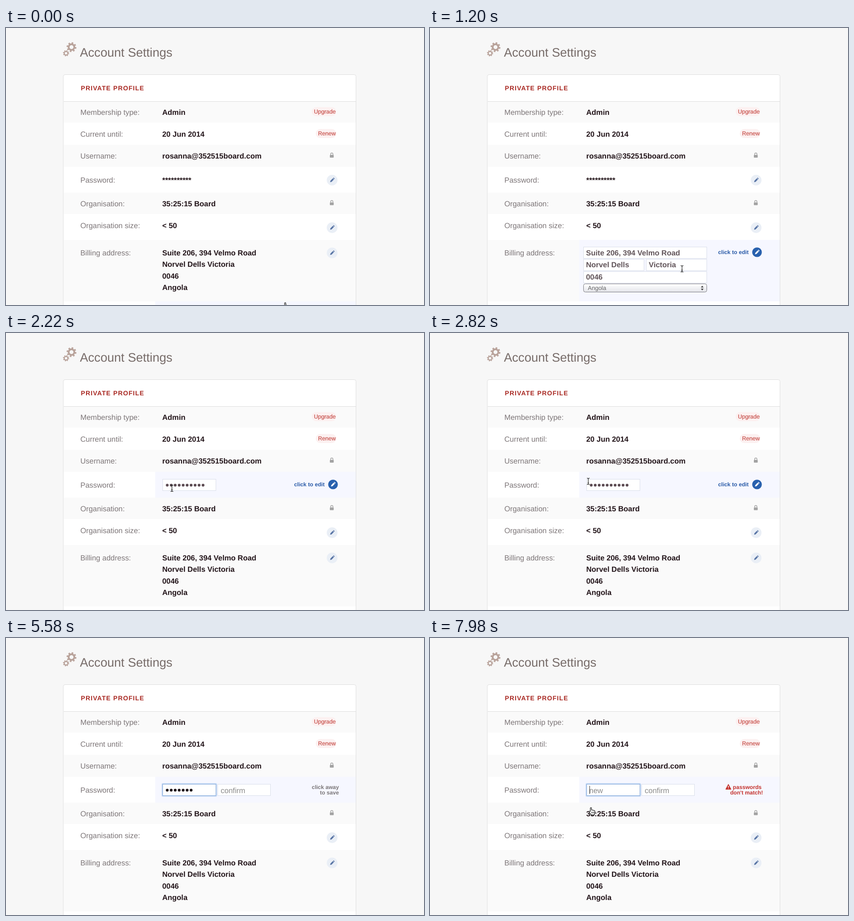
Recreate the animation shown at these times as an HTML page. Size 919 by 609 pixels, loop 8 s.

```html
<!DOCTYPE html>
<html lang="en">
<head>
<meta charset="utf-8">
<title>Account Settings</title>
<style>
  html, body { margin: 0; width: 100%; height: 100%; overflow: hidden; background: #f7f7f7; }
  svg { display: block; width: 100vw; height: 100vh; font-family: "Liberation Sans", Arial, sans-serif; }
  text { white-space: pre; text-rendering: geometricPrecision; }
  .title { font-size: 27.1px; fill: #776c69; }
  .heading { font-size: 14px; font-weight: bold; letter-spacing: 1.1px; fill: #a92a24; }
  .label { font-size: 16.4px; fill: #7d7678; }
  .value { font-size: 16.4px; font-weight: bold; fill: #23151a; }
  .entry { font-size: 16.4px; font-weight: bold; fill: #62555a; }
  .hint { font-size: 16.5px; fill: #8b8b8b; }
  .pill { font-size: 12.5px; fill: #c95651; stroke: #c95651; stroke-width: .25px; }
  .edit { font-size: 12.2px; font-weight: bold; fill: #2a5ba8; }
  .note { font-size: 12.1px; font-weight: bold; fill: #7b7779; text-anchor: end; }
  .error { fill: #c4332e; }
  .option { font-size: 13px; fill: #666; }
</style>
</head>
<body>
<svg viewBox="0 0 919 609" preserveAspectRatio="none">
  <defs>
    <linearGradient id="selectFill" x2="0" y2="1">
      <stop stop-color="#fff"/><stop offset="1" stop-color="#e4e5ea"/>
    </linearGradient>
  </defs>
  <g id="page"></g>
  <g id="live"></g>
  <g id="cursor"></g>
</svg>
<script>
const LOOP = 8000;
const BILLING = 6, PASSWORD = 3;
const STREET = "Suite 206, 394 Velmo Road", SUBURB = "Norvel Dells", POSTCODE = "0046";

const rows = [
  { label: "Membership type:", value: ["Admin"], top: 162, base: 191 },
  { label: "Current until:", value: ["20 Jun 2014"], top: 208, base: 239 },
  { label: "Username:", value: ["rosanna@352515board.com"], top: 257, base: 287, lock: 280 },
  { label: "Password:", value: ["**********"], top: 305, base: 339.5, pencil: 334.5, active: 333 },
  { label: "Organisation:", value: ["35:25:15 Board"], top: 362, base: 391.5, lock: 384.5 },
  { label: "Organisation size:", value: ["< 50"], top: 409, base: 440, pencil: 439, active: 437.5 },
  { label: "Billing address:", value: [STREET, SUBURB + " Victoria", POSTCODE, "Angola"],
    top: 466, base: 500, pencil: 494.5, active: 493 },
  { label: "", value: [], top: 601, base: 640 }
];
const rowBottom = i => i + 1 < rows.length ? rows[i + 1].top : 660;

// Pointer stops: time, x, y
const path = [
  [0, 614, 604], [420, 588, 565], [1000, 588, 565], [1620, 451, 421],
  [1720, 446, 416], [2400, 348, 326], [6900, 348, 326], [7260, 354, 373], [LOOP, 354, 373]
];
const EDIT_START = 3300, TYPE_START = 4850, NEXT_FIELD = 5750, TYPE_END = 6500, REJECTED = 7320;
const POINTER_HIDDEN = [4850, 6900];

const text = (cls, x, y, str) => `<text class="${cls}" x="${x}" y="${y}">${str.replace("<", "&lt;")}</text>`;
const rect = (x, y, w, h, fill, extra = "") =>
  `<rect x="${x}" y="${y}" width="${w}" height="${h}" fill="${fill}" ${extra}/>`;
const circle = (x, y, r, fill, extra = "") => `<circle cx="${x}" cy="${y}" r="${r}" fill="${fill}" ${extra}/>`;

function gear(x, y, r) {
  const tooth = Math.PI * r * .84 / 8;
  return circle(x, y, r * .58, "none", `stroke="#b9a39b" stroke-width="${r * .36}"`) +
    circle(x, y, r * .84, "none", `stroke="#b9a39b" stroke-width="${r * .32}" stroke-dasharray="${tooth}"`);
}

const pencil = (x, y, color) => `<path transform="translate(${x} ${y}) rotate(45) scale(.9)" fill="${color}"
  d="M-2-4.2h4v8l-2 3.2-2-3.2zM-2-7h4v1.8h-4z"/>`;

const lock = y => rect(712, y - 1, 8.5, 6, "#a3a3a3", 'rx="1"') +
  `<path d="M713.8 ${y - 1}v-1.8a2.5 2.5 0 0 1 5 0v1.8" fill="none" stroke="#a3a3a3" stroke-width="1.4"/>`;

const pill = (x, y, str) => rect(x - 5, y - 14, 736 - x - 5, 20, "#fcf1f1", 'rx="10"') + text("pill", x, y, str);

function field(x, y, w, focused) {
  const glow = focused ? rect(x - 1, y - 1, w + 2, 28, "none", 'rx="2" stroke="#c9dcf5" stroke-width="2"') : "";
  return glow + rect(x + .5, y + .5, w - 1, 25, "#fff", `stroke="${focused ? "#7fa5d8" : "#d9deea"}"`);
}

const dots = (x, n, color) =>
  Array.from({ length: n }, (_, i) => circle(x + i * 8.75, 334.5, 3.1, color)).join("");

const caret = x => rect(x, 325, 1, 18, "#222");

function drawPage() {
  let out = rect(0, 0, 919, 609, "#f7f7f7") + rect(0, 0, 1, 609, "#fcfcfc") +
    gear(144, 42, 10.8) + gear(132, 55.5, 6.8) + text("title", 162.5, 63, "Account Settings") +
    rect(126, 102.5, 643.5, 560, "#fff", 'rx="4" stroke="#dedede"') +
    text("heading", 164.5, 137, "PRIVATE PROFILE");
  rows.forEach((row, i) => {
    if (i % 2 === 0) out += rect(127, row.top, 642, rowBottom(i) - row.top, "#fafafa");
    out += text("label", 163.5, row.base, row.label);
    if (row.lock) out += lock(row.lock);
  });
  return out + rect(127, 161, 642, 1, "#dcdcdc") + pill(677, 188, "Upgrade") + pill(686, 236, "Renew");
}

function drawBillingForm() {
  return field(337, 481, 272) + field(337, 508, 134) + field(475, 508, 134) + field(337, 535, 272) +
    text("entry", 343, 499.5, STREET) + text("entry", 343, 526, SUBURB) +
    text("entry", 481, 526, "Victoria") + text("entry", 343, 553, POSTCODE) +
    rect(337.5, 562.5, 271, 18, "url(#selectFill)", 'rx="4" stroke="#77777c"') +
    text("option", 347, 576, "Angola") +
    `<path d="M595.5 570.5l3-4 3 4zM595.5 573l3 4 3-4z" fill="#444"/>`;
}

function drawPasswordForm(t) {
  const typed = (start, end, n) => Math.max(0, Math.min(n, Math.ceil((t - start) / (end - start) * n)));
  const rejected = t >= REJECTED;
  const first = rejected ? 0 : typed(TYPE_START, NEXT_FIELD - 100, 7);
  const second = rejected ? 0 : typed(NEXT_FIELD, TYPE_END, 9);
  const onSecond = !rejected && t >= NEXT_FIELD;
  let out = field(344, 321, 118, !onSecond) + field(465, 321, 117, onSecond) +
    (first ? dots(354.5, first, "#1d1216") : text("hint", 350, 341, "new")) +
    (second ? dots(476, second, "#1d1216") : text("hint", 472, 341, "confirm"));
  if (!first) out += caret(350.5);
  if (rejected) {
    return out + `<path d="M656 322l5.5 10.5h-11z" fill="#c4332e" stroke="#c4332e" stroke-width="1.5" stroke-linejoin="round"/>
      <path d="M656 325v4m0 1.2v1.4" stroke="#fff" stroke-width="1.5"/>` +
      text("note error", 729, 332, "passwords") + text("note error", 732, 344, "don't match!");
  }
  return out + text("note", 732, 332, "click away") + text("note", 732, 344, first ? "to save" : "to cancel");
}

function drawLive(t, active) {
  const editing = t >= EDIT_START;
  return rows.map((row, i) => {
    const on = i === active;
    let out = "";
    if (on && (row.pencil || !row.label)) out += rect(328, row.top, 441, rowBottom(i) - row.top, "#f6f7ff");
    if (on && i === BILLING) out += drawBillingForm();
    else if (on && i === PASSWORD) out += editing ? drawPasswordForm(t) : field(344, 321, 118) + dots(354.5, 10, "#5c4b52");
    else out += row.value.map((line, n) => text("value", 343.5, row.base + n * 25.3, line)).join("");
    if (row.pencil && !on) out += circle(717, row.pencil, 11.8, "#eaeff6") + pencil(717, row.pencil, "#5a76a6");
    if (row.pencil && on && !(editing && i === PASSWORD)) {
      out += text("edit", 633.5, row.active + 4.2, "click to edit") +
        circle(719, row.active, 10.6, "#2961ae") + pencil(719, row.active, "#fff");
    }
    return out;
  }).join("");
}

const pointers = {
  arrow: `<path d="M0 0v14l3.3-3.1 2.3 5.2 2.4-1-2.3-5.1h4.5z" fill="#111" stroke="#fff"/>`,
  hand: `<path d="M-1.5 8V1.2a1.3 1.3 0 0 1 2.7 0V5l5.5 1.2q2.2.6 2 2.8l-1.2 4.4V16H.8L-4.2 9.8q-.4-2 1.2-2z"
    fill="#fff" stroke="#222" stroke-width="1.3"/><path d="M1.5 9v3.5m2.3-3.5v3.5m2.3-3.5v3.5" stroke="#222"/>`,
  beam: `<path d="M-3-7q3 0 3 2V5q0 2-3 2M3-7q-3 0-3 2M3 7q-3 0-3-2M-1.5 3h3" fill="none" stroke="#222" stroke-width="1.2"/>`
};

function pointerAt(t) {
  const next = Math.max(1, path.findIndex(stop => stop[0] > t));
  const [t0, x0, y0] = path[next - 1], [t1, x1, y1] = path[next];
  const u = (t - t0) / (t1 - t0), ease = u * u * (3 - 2 * u);
  return { x: x0 + (x1 - x0) * ease, y: y0 + (y1 - y0) * ease };
}

function pointerKind({ x, y }, active) {
  const inside = (left, top, right, bottom) => x >= left && x <= right && y >= top && y <= bottom;
  if (active === BILLING && inside(337, 562, 608, 581)) return "arrow";
  if (active === BILLING && inside(337, 481, 608, 561)) return "beam";
  if (active === PASSWORD && inside(344, 321, 461, 347)) return "beam";
  return "hand";
}

const [page, live, cursor] = ["page", "live", "cursor"].map(id => document.getElementById(id));
page.innerHTML = drawPage();
let shown = "";

function frame(now) {
  const t = now % LOOP;
  const p = pointerAt(t);
  const hovered = rows.findIndex((row, i) => p.y >= row.top && p.y < rowBottom(i));
  const active = t >= EDIT_START ? PASSWORD : hovered;
  const markup = drawLive(t, active);
  if (markup !== shown) live.innerHTML = shown = markup;
  const hidden = t >= POINTER_HIDDEN[0] && t < POINTER_HIDDEN[1];
  cursor.innerHTML = hidden ? "" : pointers[pointerKind(p, active)];
  cursor.setAttribute("transform", `translate(${p.x.toFixed(1)} ${p.y.toFixed(1)})`);
  requestAnimationFrame(frame);
}
frame(0);
</script>
</body>
</html>
```
